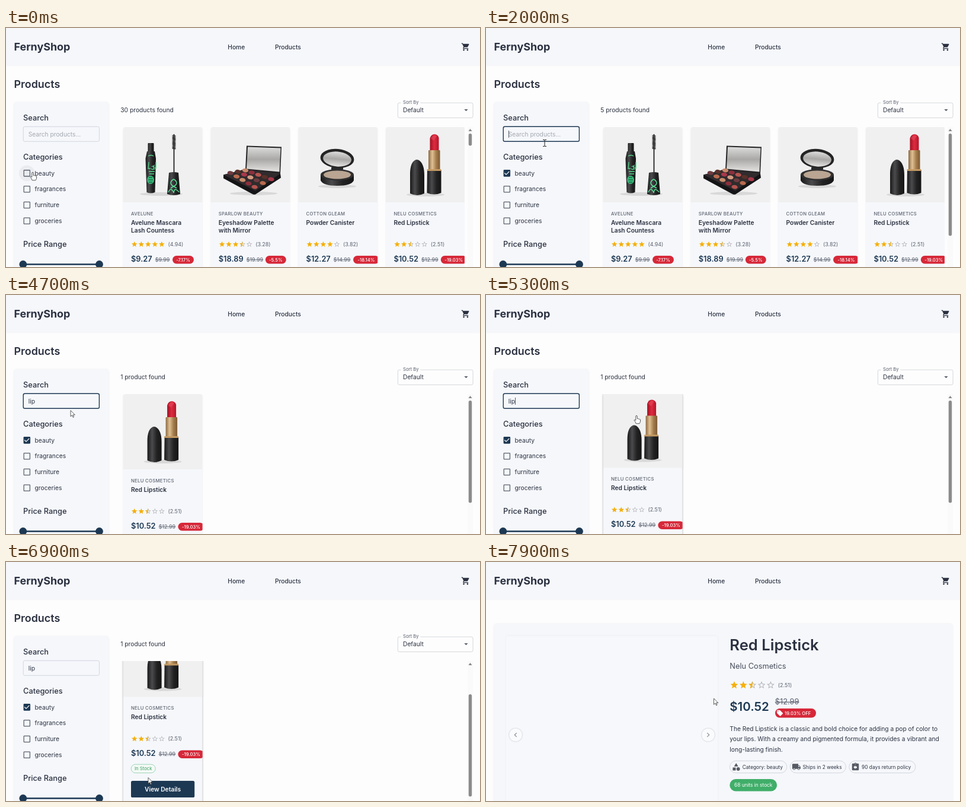
Animation of 800 by 403 pixels, one loop 8 s. Source, as an HTML page:

```html
<!DOCTYPE html>
<html lang="en">
<head>
<meta charset="utf-8">
<title>Shop demo</title>
<style>
html, body { margin: 0; width: 100%; height: 100%; overflow: hidden; background: #fdfdfd; }
svg { display: block; width: 800px; height: 403px; font-family: Inter, "Open Sans", sans-serif; }
text { white-space: pre; }
</style>
</head>
<body>
<svg id="stage" viewBox="0 0 800 403"></svg>
<script>
const U = 0.64; // page zoom: one CSS pixel of the shop on the stage
const INK = '#2b3140', NAVY = '#1d3853', PANEL = '#f5f7fb', GREY = '#5b616e', LINE = '#c3c7cf', RED = '#d62839';

const text = (x, y, s, size = 16, weight = 400, fill = INK, more = '') =>
  `<text x="${x}" y="${y}" font-size="${size * U}" font-weight="${weight}" fill="${fill}" ${more}>${s}</text>`;
const rect = (x, y, w, h, r, fill, more = '') =>
  `<rect x="${x}" y="${y}" width="${w}" height="${h}" rx="${r}" fill="${fill}" ${more}/>`;
const path = (d, fill, more = '') => `<path d="${d}" fill="${fill}" ${more}/>`;
const ellipse = (x, y, rx, ry, fill, more = '') =>
  `<ellipse cx="${x}" cy="${y}" rx="${rx}" ry="${ry}" fill="${fill}" ${more}/>`;
const icon = (x, y, d, fill = INK, k = U) =>
  path(d, fill, `fill-rule="evenodd" transform="translate(${x} ${y}) scale(${k})"`);
const group = (id, body, more = '') => `<g id="${id}" ${more}>${body}</g>`;
const gradient = (id, colors, down = 0) =>
  `<linearGradient id="${id}" x2="${1 - down}" y2="${down}">` + colors.map((c, i) =>
    `<stop offset="${i / (colors.length - 1)}" stop-color="${c}"/>`).join('') + '</linearGradient>';
const clip = (id, x, y, w, h, r = 0) => `<clipPath id="${id}">${rect(x, y, w, h, r, '#000')}</clipPath>`;

const ICON = {
  cart: 'M7 18a2 2 0 1 0 0 4 2 2 0 0 0 0-4zM1 2v2h2l3.6 7.59-1.35 2.45c-.16.28-.25.61-.25.96 0 1.1.9 2 2 2h12v-2H7.42c-.14 0-.25-.11-.25-.25l.03-.12.9-1.63h7.45c.75 0 1.41-.41 1.75-1.03l3.58-6.49c.08-.14.12-.31.12-.48 0-.55-.45-1-1-1H5.21l-.94-2zM17 18a2 2 0 1 0 0 4 2 2 0 0 0 0-4z',
  box: 'M19 5v14H5V5zM19 3H5a2 2 0 0 0-2 2v14a2 2 0 0 0 2 2h14a2 2 0 0 0 2-2V5a2 2 0 0 0-2-2z',
  checked: 'M19 3H5a2 2 0 0 0-2 2v14a2 2 0 0 0 2 2h14a2 2 0 0 0 2-2V5a2 2 0 0 0-2-2zM10 17l-5-5 1.41-1.41L10 14.17l7.59-7.59L19 8z',
  star: 'M12 17.27L18.18 21l-1.64-7.03L22 9.24l-7.19-.61L12 2 9.19 8.63 2 9.24l5.46 4.73L5.82 21z',
  half: 'M12 17.27V2L9.19 8.63 2 9.24l5.46 4.73L5.82 21z',
  hollow: 'M22 9.24l-7.19-.62L12 2 9.19 8.63 2 9.24l5.46 4.73L5.82 21 12 17.27 18.18 21l-1.63-7.03zM12 15.4l-3.76 2.27 1-4.28-3.32-2.88 4.38-.38L12 6.1l1.71 4.04 4.38.38-3.32 2.88 1 4.28z',
  shapes: 'M12 2l-5.5 9h11zM17.5 13a4.5 4.5 0 1 0 0 9 4.5 4.5 0 0 0 0-9zM3 13.5h8v8H3z',
  truck: 'M20 8h-3V4H3c-1.1 0-2 .9-2 2v11h2a3 3 0 0 0 6 0h6a3 3 0 0 0 6 0h2v-5zM6 15.5a1.5 1.5 0 1 0 0 3 1.5 1.5 0 0 0 0-3zM19.5 9.5l1.96 2.5H17V9.5zM18 15.5a1.5 1.5 0 1 0 0 3 1.5 1.5 0 0 0 0-3z',
  giveBack: 'M19 3h-4.18a3 3 0 0 0-5.64 0H5a2 2 0 0 0-2 2v14a2 2 0 0 0 2 2h14a2 2 0 0 0 2-2V5a2 2 0 0 0-2-2zM12 3a1 1 0 1 1 0 2 1 1 0 0 1 0-2zM16 15h-4v3l-5-5 5-5v3h4z',
  tag: 'M21.41 11.58l-9-9A2 2 0 0 0 11 2H4a2 2 0 0 0-2 2v7c0 .55.22 1.05.59 1.42l9 9a2 2 0 0 0 2.82 0l7-7a2 2 0 0 0 0-2.84zM5.5 4a1.5 1.5 0 1 1 0 3 1.5 1.5 0 0 1 0-3z',
  left: 'M15.41 7.41L14 6l-6 6 6 6 1.41-1.41L10.83 12z',
  right: 'M10 6L8.59 7.41 13.17 12l-4.58 4.59L10 18l6-6z'
};

const stars = (x, y, n, k) => [0, 1, 2, 3, 4].map(i => {
  const sx = x + i * 24 * k;
  if (n >= i + 1) return icon(sx, y, ICON.star, '#f5b00c', k);
  return icon(sx, y, ICON.hollow, '#b3b5b9', k) + (n > i ? icon(sx, y, ICON.half, '#f5b00c', k) : '');
}).join('');

const floor = (x, y, rx) => ellipse(x, y, rx, 3, '#000', 'opacity=".1"');

function mascara() {
  let bristles = '';
  for (let y = 181; y < 204; y += 1.7) bristles += `M280.5 ${y}l6 .8`;
  return floor(262, 280, 36) +
    rect(239.5, 194, 10, 17, 1, 'url(#dark)') +
    path('M238 208h13l2 12-1.500 57q-7.500 3-14 0L235.500 220z', 'url(#dark)') +
    path('M240 216q5-3 9 0M241 226l-1 11h4M246 234q3-3 3 2t-4 1M251 231q-4 2 0 4t-2 3M253 226v11M241 242h10M242 246h8', 'none', 'stroke="#55d98f" stroke-width="1.300"') +
    ellipse(244, 256, 6, 7, '#36b878') + path('M241 252h6M240 256h8M241 260h6', 'none', 'stroke="#14402b"') +
    path('M283.500 179V244', 'none', 'stroke="#222" stroke-width="1.800"') +
    path(bristles, 'none', 'stroke="#222" stroke-width="1.100"') +
    path('M275 244q8-2 16 0l3 36q-11 4-22 0z', 'url(#dark)') +
    path('M283 255c-7 4-6 9 0 12 6-3 7-8 0-12M274 277q3-7 6-4t3 5q1-8 5-5t4 4M278 270l5-3 5 3', 'none', 'stroke="#5fe09a" stroke-width="1.500"');
}

function palette() {
  const shades = ['#c98b6b', '#8d2f3c', '#b5544f', '#5a3029', '#a8384a', '#d49a83', '#6d3b3f', '#b96a4e'];
  let pans = '';
  for (let row = 0; row < 3; row++) for (let col = 0; col < 5; col++) {
    const u = (col + 0.5) / 5, v = (row + 0.5) / 3;
    pans += ellipse(402 + 57 * u - 36 * v - 3 * u * v, 239 + 8 * u + 10 * v + 17 * u * v, 5.2, 3.3,
      shades[(row * 3 + col) % 8], 'transform="rotate(8 415 257)"');
  }
  return floor(418, 279, 40) +
    path('M406 198.500l59 2-2 45-59-6z', '#242325') +
    path('M408 200.500l55.500 2-2 40-55.500-5z', 'url(#mirror)') +
    path('M404 238l59 7.500 1 7-43 28q-3 1-6-1l-48-26v-6z', '#151417') +
    path('M404 238l59 7.500-42 29-54-27z', '#302b2d') + pans;
}

const powder = () => floor(559, 267, 32) +
  path('M531 248v9q4 9 28 9t28-9v-9z', 'url(#dark)') +
  ellipse(559, 220, 28.5, 16, '#242425', 'transform="rotate(5 559 220)"') +
  ellipse(559, 221, 24, 12.5, 'url(#mirror)', 'transform="rotate(5 559 221)"') +
  path('M549 235h20v7h-20z', '#29292a') +
  ellipse(559, 247.5, 28, 9.5, '#303031') + ellipse(559, 247.5, 23, 7, '#b9a592');

const lipstick = () => floor(708, 281, 32) +
  path('M682 279V246q0-18 8-23 3-2 7 0 9 6 9 25v31q-12 6-24 0z', 'url(#dark)') +
  path('M715.500 209V186q2-7 8-7 6 1 7 6v24z', 'url(#red)') +
  path('M717 186q4-7 10-4l-5 8z', '#e9485b', 'opacity=".6"') +
  rect(713, 206, 19.5, 36, 1, 'url(#gold)') +
  path('M711 240h23.500v38q-12 5-24 0z', 'url(#dark)') + rect(710.5, 238, 24, 3, 1, '#c59a63');

const products = [
  ['AVELUNE', ['Avelune Mascara', 'Lash Countess'], 5, '4.94', '9.27', '9.99', '-7.17%', 83.4, 36, mascara],
  ['SPARLOW BEAUTY', ['Eyeshadow Palette', 'with Mirror'], 3.5, '3.28', '18.89', '19.99', '-5.5%', 92.4, 35, palette],
  ['COTTON GLEAM', ['Powder Canister'], 4, '3.82', '12.27', '14.99', '-18.14%', 92.8, 44, powder],
  ['NELU COSMETICS', ['Red Lipstick'], 2.5, '2.51', '10.52', '12.99', '-19.03%', 92.8, 44, lipstick]
];
const slotX = i => 197.6 + 147.8 * i;

function card(slot, p) {
  const [brand, name, rate, score, price, old, off, chipX, chipW, art] = products[p];
  return `<g transform="translate(${slotX(slot)})"><g clip-path="url(#card)">` +
    rect(0, 167, 134, 310, 0, PANEL) + rect(0, 167, 134, 127, 0, '#f0f0f0') +
    `<g transform="translate(${-slotX(p)})">${art()}</g>` +
    text(13.4, 315.5, brand, 12, 500, GREY, 'letter-spacing=".32"') +
    name.map((s, i) => text(13.4, 331.7 + 13.3 * i, s, 16, 600)).join('') +
    stars(13.4, 358.8, rate, 0.48) + text(75.8, 367.8, `(${score})`, 14, 400, GREY) +
    text(13.4, 393.8, `$${price}<tspan dx="5.1" font-size="${14 * U}" font-weight="400" fill="${GREY}" text-decoration="line-through">$${old}</tspan>`, 20, 600, NAVY) +
    rect(chipX, 384, chipW, 13.5, 6.7, RED) +
    text(chipX + chipW / 2, 393.5, off, 12, 500, '#fff', 'text-anchor="middle"') +
    rect(13.6, 407.8, 41, 14.4, 7.2, '#f3faf6', 'stroke="#6fbf8e" stroke-width=".64"') +
    text(34.1, 417.8, 'In Stock', 12, 400, '#3d9f63', 'text-anchor="middle"') +
    rect(13.4, 435.6, 107.2, 28, 2.6, NAVY, 'class="buy"') +
    text(67, 453.2, 'View Details', 16, 600, '#fff', 'text-anchor="middle"') + '</g></g>';
}

const shadow = 'filter="drop-shadow(0 .6px 1px rgba(0,0,0,.07))"';
const categories = ['beauty', 'fragrances', 'furniture', 'groceries'];

const header = rect(0, 0, 800, 63, 0, PANEL, shadow) + text(13.5, 38.3, 'FernyShop', 28, 700) +
  text(374.3, 35.5, 'Home', 16, 500) + text(454, 35.5, 'Products', 16, 500) + icon(768.1, 24.3, ICON.cart);

const shop = text(13.5, 101, 'Products', 28, 600) +
  rect(13.5, 125, 160, 300, 5, PANEL, shadow) +
  text(29, 156, 'Search', 20, 500) + text(29, 221.5, 'Categories', 20, 500) + text(29, 369, 'Price Range', 20, 500) +
  rect(29.2, 166.3, 128.200, 25, 2.6, 'none', 'id="field"') +
  text(37.7, 182.5, 'Search products...', 16, 400, '#a4a8af', 'id="hint"') +
  text(37.7, 182.5, '', 16, 400, INK, 'id="query"') +
  rect(0, 173, 0.8, 12, 0, INK, 'id="caret"') +
  ellipse(35.3, 245, 13.4, 13.4, '#000', 'id="halo" opacity=".045"') +
  categories.map((s, i) => group('box' + i, icon(27.6, 237.2 + 26.8 * i, ICON.box, GREY)) +
    text(48.6, 248.6 + 26.8 * i, s)).join('') +
  group('tick', icon(27.6, 237.2, ICON.checked, NAVY)) +
  rect(28.7, 397.2, 128.8, 2.6, 1, NAVY) + ellipse(28.8, 398.5, 6.4, 6.4, NAVY) + ellipse(157.5, 398.5, 6.4, 6.4, NAVY) +
  text(193.3, 142, '', 16, 400, INK, 'id="count"') +
  rect(661.3, 126.2, 126.8, 25.2, 2.6, 'none', `stroke="${LINE}" stroke-width=".7"`) +
  rect(666.5, 124, 33, 4, 0, '#fdfdfd') + text(670, 128.4, 'Sort By', 12, 400, GREY) + text(670, 142.4, 'Default') +
  path('M773.300 137h6.400l-3.200 3.300z', GREY) +
  `<g clip-path="url(#grid)"><g id="scroller">` +
  group('many', products.map((p, i) => card(i, i)).join(''), shadow) + group('one', card(0, 3)) + '</g></g>' +
  rect(779.5, 167, 8.5, 236, 0, '#fafafa') + path('M780.500 174l3-4 3 4z', '#858585') +
  rect(780.8, 178, 5.4, 20, 2.7, '#8b8b8b', 'id="thumb"');

const pill = (x, w, d, s) => rect(x, 335.3, w, 20.4, 10.2, 'none', `stroke="${LINE}" stroke-width=".7"`) +
  icon(x + 3, 337.8, d, '#565a63') + text(x + 21.3, 348.5, s, 13);
const arrow = (x, d) => ellipse(x, 291.5, 10.8, 10.8, '#fafbfd', 'filter="drop-shadow(0 .8px 1.2px rgba(0,0,0,.25))"') +
  icon(x - 7.7, 283.8, d, '#8d9097');

const detail = rect(13.5, 104, 774.5, 320, 5, PANEL, shadow) +
  rect(33.8, 124.6, 357.6, 300, 4, '#f6f8fc', shadow) + arrow(50, ICON.left) + arrow(375, ICON.right) +
  text(411.3, 149.2, 'Red Lipstick', 40, 600) + text(411.3, 179.5, 'Nelu Cosmetics', 20, 400, '#474d5a') +
  stars(411.3, 199.8, 2.5, U) + text(492.8, 210.6, '(2.51)', 14, 400, GREY) +
  text(411.3, 251.3, '$10.52', 32, 600, NAVY) +
  text(487.8, 240.3, '$12.99', 20, 400, GREY, 'text-decoration="line-through"') +
  rect(488, 247, 69, 15.4, 7.7, RED) + icon(490, 248.8, ICON.tag, '#fff', 0.5) +
  text(504, 257.5, '19.03% OFF', 12, 500, '#fff') +
  ['The Red Lipstick is a classic and bold choice for adding a pop of color to',
   'your lips. With a creamy and pigmented formula, it provides a vibrant and',
   'long-lasting finish.'].map((s, i) => text(411.3, 285 + 17.4 * i, s)).join('') +
  pill(411.5, 96.3, ICON.shapes, 'Category: beauty') + pill(513.2, 94.2, ICON.truck, 'Ships in 2 weeks') +
  pill(612.8, 112, ICON.giveBack, '90 days return policy') +
  rect(411.3, 366, 79.8, 20.5, 10.2, '#40ae69') + text(419, 379.2, '68 units in stock', 13, 400, '#fff');

const outline = 'stroke="#333" stroke-width=".8" stroke-linejoin="round"';
const pointers = group('hand', path('M-1.200 1q1.200-1.700 2.400 0V5.500q1.300-.8 2 .5 1.500-.6 2 .7 1.500-.3 1.500 1.300 0 4-1.700 5.800H-.8Q-2 10-4 8.300q0-2 2.800 0z', '#fff', outline)) +
  group('arrow', path('M0 0v10.300l2.400-2.200 1.700 3.700 1.500-.7-1.600-3.600h3.300z', '#fff', outline)) +
  group('beam', path('M-3-5.500h2.200l.8.600.8-.6H3M-3 5.500h2.200l.8-.6.8.6H3M0-5V5', 'none', 'stroke="#222"'));

const stage = document.getElementById('stage');
stage.innerHTML = '<defs>' + clip('grid', 192, 167, 582, 236) + clip('card', 0, 167, 134, 310, 5) +
  gradient('dark', ['#19191a', '#4b4b4d', '#222223', '#151516']) + gradient('gold', ['#8d6a41', '#e0c093', '#a57d4c', '#7b5a35']) +
  gradient('red', ['#a50f22', '#dd2b40', '#b3152a']) + gradient('mirror', ['#dcdcdc', '#a9a8a6', '#e5e4e2'], 1) +
  '</defs>' + header + group('shop', shop) + group('detail', detail) + group('pointer', pointers);

const $ = id => document.getElementById(id);
const show = (id, on) => $(id).style.display = on ? '' : 'none';
const ramp = (t, a, b) => {
  const k = Math.min(1, Math.max(0, (t - a) / (b - a)));
  return k * k * (3 - 2 * k);
};

// time, x, y of the pointer
const route = [[0, 45, 243], [1000, 45, 243], [1650, 99, 194], [4600, 99, 194], [5250, 254, 203], [5600, 254, 203],
  [6050, 270, 273.5], [6450, 270, 273.5], [6900, 240, 363.5], [7100, 252, 380], [7450, 252, 380], [7850, 384.5, 230]];
const shapes = [[0, 'hand'], [1150, 'arrow'], [1550, 'beam'], [4700, 'arrow'], [5050, 'hand'], [5750, 'arrow'], [6980, 'hand'], [7500, 'arrow']];
const FOCUS = 1700, BLUR = 5700, FILTER = 4500, LEAVE = 7500;
const keys = [3700, 3850, 4000];

function draw(t) {
  const away = t >= LEAVE, single = t >= FILTER, focused = t >= FOCUS && t < BLUR;
  show('shop', !away);
  show('detail', away);

  show('halo', t < 1150);
  show('box0', t < 300);
  show('tick', t >= 300);
  $('count').textContent = single ? '1 product found' : (t < 600 ? 30 : 5) + ' products found';

  const typed = keys.filter(k => t >= k).length;
  $('query').textContent = 'lip'.slice(0, typed);
  show('hint', !typed);
  $('field').setAttribute('stroke', focused ? NAVY : LINE);
  $('field').setAttribute('stroke-width', focused ? 1.4 : 0.7);
  const sinceKey = t - (typed ? keys[typed - 1] : FOCUS);
  show('caret', focused && Math.floor(sinceKey / 530) % 2 === 0);
  $('caret').setAttribute('x', 37.9 + (typed && !away ? $('query').getComputedTextLength() : 0));

  const scroll = ramp(t, 5500, 5900), hover = ramp(t, 5000, 5200);
  show('many', !single);
  show('one', single);
  $('scroller').setAttribute('transform', `translate(0 ${-64 * scroll})`);
  $('one').setAttribute('transform', `translate(0 ${-2.56 * hover})`);
  $('one').style.filter = `drop-shadow(0 ${0.6 + hover}px ${1 + hover * 0.8}px rgba(0,0,0,${0.07 + 0.3 * hover}))`;
  $('one').querySelector('.buy').setAttribute('fill', t >= 6980 ? '#152a3f' : NAVY);
  $('thumb').setAttribute('y', 178 + 45 * scroll);
  $('thumb').setAttribute('height', t < 600 ? 20.5 : 172.5);

  let x = 45, y = 243;
  for (let i = 1; i < route.length; i++) {
    const [a] = route[i - 1], [b, bx, by] = route[i], k = ramp(t, a, b);
    x += (bx - x) * k;
    y += (by - y) * k;
  }
  $('pointer').setAttribute('transform', `translate(${x} ${y})`);
  const current = shapes.filter(s => t >= s[0]).pop()[1];
  ['hand', 'arrow', 'beam'].forEach(s => show(s, s === current));
}

const start = performance.now();
function tick() {
  draw((performance.now() - start) % 8000);
  requestAnimationFrame(tick);
}
tick();
</script>
</body>
</html>
```
